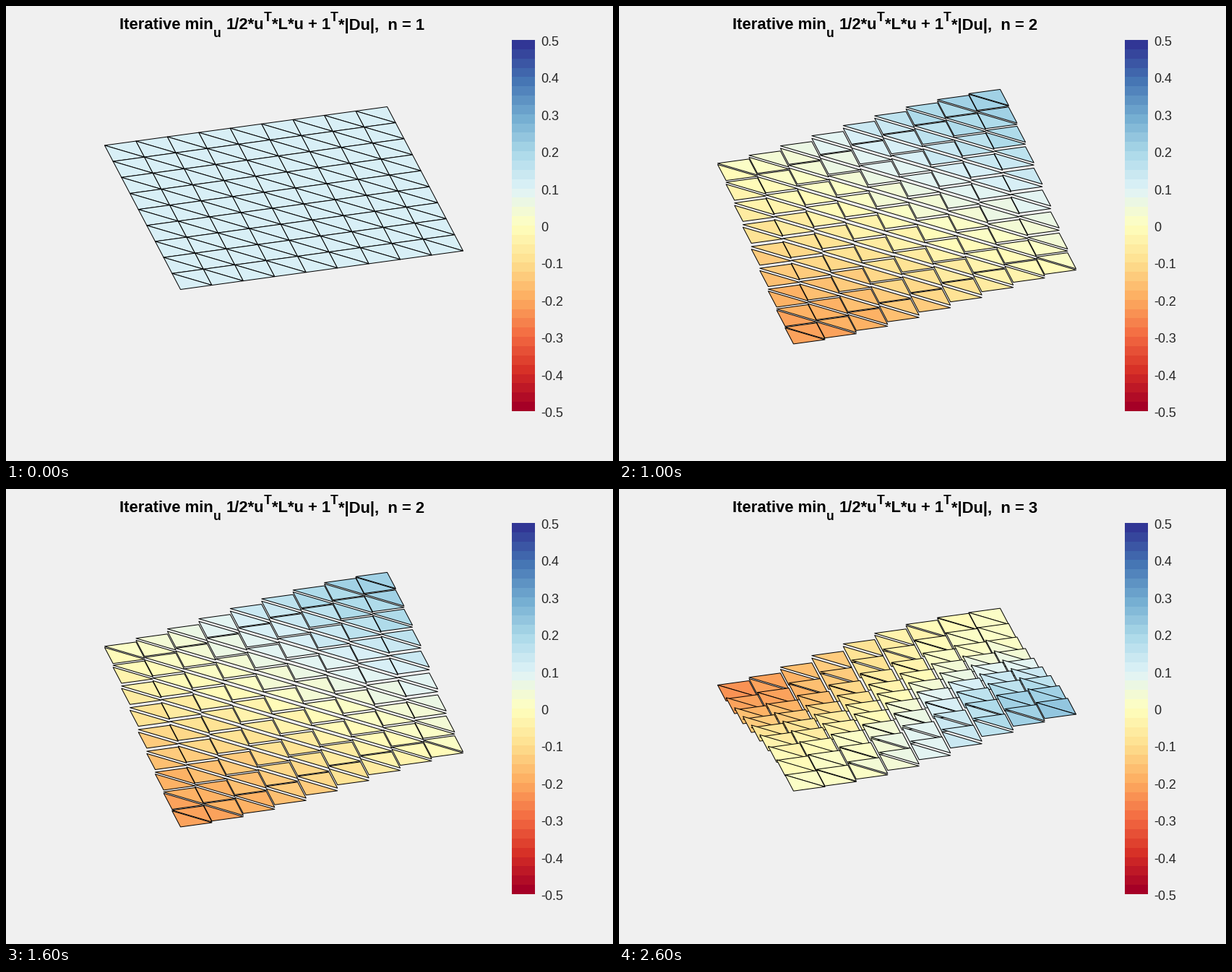
Write a matplotlib script that moves like this. It is 840 by 630 pixels and loops after 3 s.

```python
import numpy as np
import matplotlib.pyplot as plt
from matplotlib.animation import FuncAnimation
from matplotlib.collections import PolyCollection

W, H = 840, 630
N = 9                                   # cells per side
LEVELS = 40
ORIGIN = np.array([136.5, 193.0])
RIGHT = np.array([391.0, -53.5]) / N
DOWN = np.array([105.0, 199.5]) / N
LIFT = 231                              # pixels per unit of u
CMAP = plt.get_cmap("RdYlBu", LEVELS)


def tri(i, j, lower):
    """Index of a cell's upper-right (0) or lower-left (1) triangle."""
    return 2 * (j * N + i) + lower


def dual_laplacian():
    lap = np.zeros((2 * N * N, 2 * N * N))

    def link(a, b, weight):
        lap[a, a] += weight
        lap[b, b] += weight
        lap[a, b] -= weight
        lap[b, a] -= weight

    for j in range(N):
        for i in range(N):
            upper = tri(i, j, 0)
            link(upper, tri(i, j, 1), np.sqrt(2))
            if i < N - 1:
                link(upper, tri(i + 1, j, 1), 1)
            if j > 0:
                link(upper, tri(i, j - 1, 1), 1)
    return lap


def mesh():
    def point(i, j):
        return ORIGIN + i * RIGHT + j * DOWN

    faces = []
    for j in range(N):
        for i in range(N):
            start, end = point(i, j), point(i + 1, j + 1)
            faces.append([start, point(i + 1, j), end])
            faces.append([start, point(i, j + 1), end])
    return np.array(faces)


def first_modes():
    # each face has area 1/2, so unit mass means a norm of sqrt(2)
    vectors = np.linalg.eigh(dual_laplacian())[1][:, :3].T * np.sqrt(2)
    positive = [0, tri(N - 1, 0, 0), tri(N - 1, N - 1, 0)]
    return [v * np.sign(v[k]) for v, k in zip(vectors, positive)]


FACES = mesh()
MODES = first_modes()
FLAT = MODES[0].mean()

fig = plt.figure(figsize=(W / 100, H / 100), dpi=100, facecolor="#f0f0f0")
ax = fig.add_axes([0, 0, 1, 1])
ax.axis("off")


def label(x, y, text, px, **style):
    return ax.text(x, y, text, fontsize=px * 0.72, family="Liberation Sans",
                   ha="left", va="baseline", **style)


# colour bar
ax.imshow(np.arange(LEVELS)[::-1, None], cmap=CMAP, aspect="auto",
          interpolation="nearest", extent=(700, 732, 561, 47))
for k in range(5, -6, -1):
    label(740, 304 + 1.5 + 6.5 - 51.4 * k, f"{k / 10:g}", 18, color="#262626")

# title
BASE, SUB, SUP = 32.5, 43, 21
for x, y, text, px in [(157, BASE, "Iterative min", 22),
                       (287, SUB, "u", 17.6),
                       (304.3, BASE, "1/2*u", 22),
                       (356.7, SUP, "T", 17.6),
                       (367.5, BASE, "*L*u + 1", 22),
                       (449, SUP, "T", 17.6)]:
    label(x, y, text, px, weight="bold", color="black")
tail = label(459.8, BASE, "", 22, weight="bold", color="black")

patches = PolyCollection(FACES, edgecolors="black", linewidths=0.72)
ax.add_collection(patches)
ax.set_xlim(0, W)
ax.set_ylim(H, 0)


def update(frame):
    u = MODES[frame]
    verts = FACES.copy()
    verts[:, :, 1] -= LIFT * (u - FLAT)[:, None]
    patches.set_verts(verts)
    bins = np.floor((u + 0.5) * LEVELS).astype(int).clip(0, LEVELS - 1)
    patches.set_facecolor(CMAP(bins))
    tail.set_text(f"*|Du|,  n = {frame + 1}")
    return patches, tail


anim = FuncAnimation(fig, update, frames=3, interval=1000, repeat=True,
                     repeat_delay=0)
plt.show()
```
